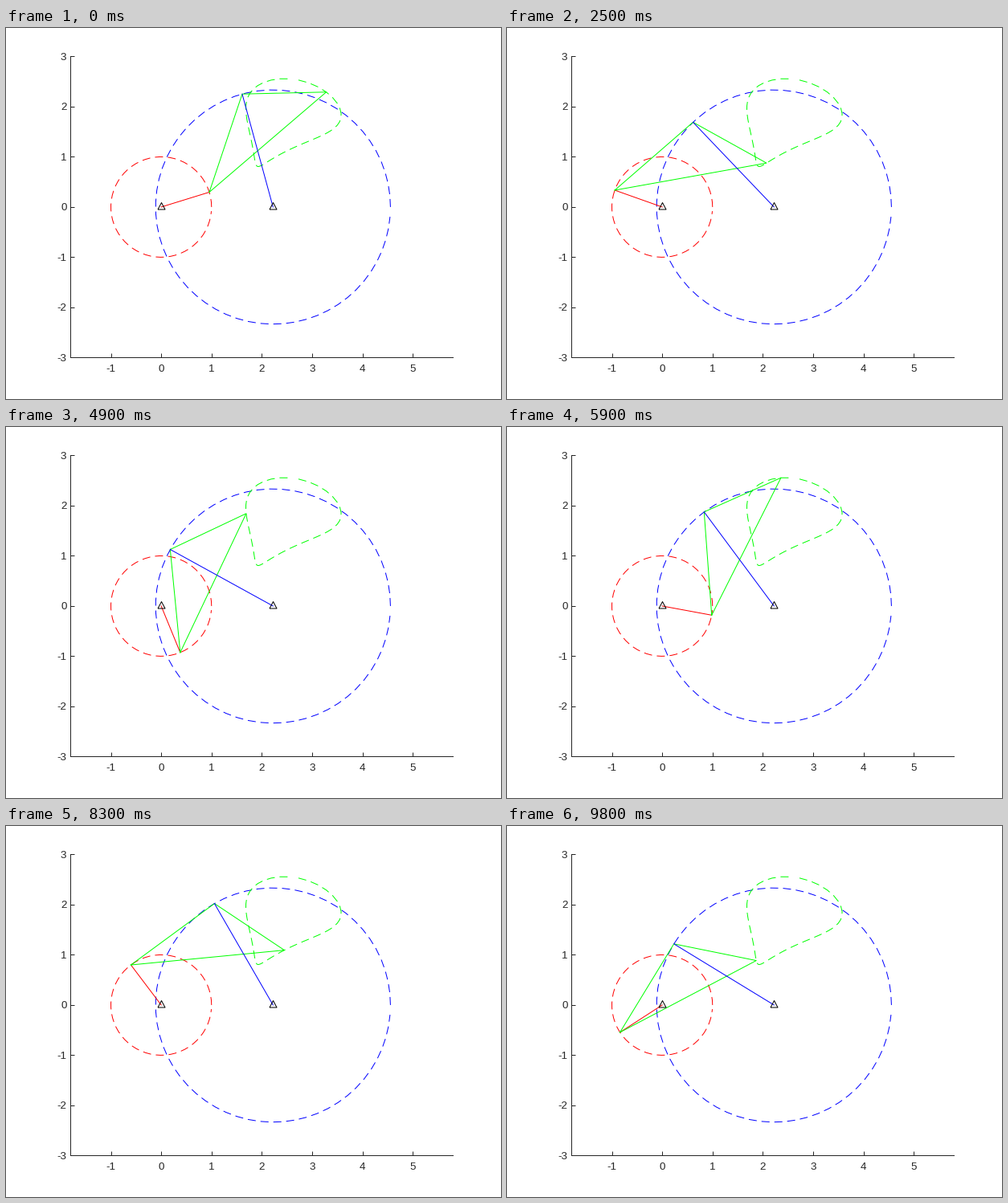
A matplotlib script for the animation above (9900 ms loop, 616 by 462 pixels).

```python
import numpy as np
import matplotlib.pyplot as plt
from matplotlib.animation import FuncAnimation

W, H, DPI = 616, 462, 100
PX = 72 / DPI                        # one pixel in points
FRAMES, INTERVAL = 99, 100

CRANK, COUPLER, ROCKER, BASE = 1.0, 2.062, 2.333, 2.222
ARM_A, ARM_B = 3.063, 1.671          # coupler point to either coupler joint
RED, GREEN, BLUE = (1, 0, 0), (0, 1, 0), (0, 0, 1)
GREY = "0.15"

plt.rcParams.update({
    "font.family": "Liberation Sans",
    "font.size": 9.6,
    "axes.unicode_minus": False,
    "lines.linewidth": PX,
    "lines.scale_dashes": True,
})


def meet(p, rp, q, rq, side):
    """Intersection of two circles, on the left (+1) or right (-1) of p -> q."""
    gap = q - p
    d = abs(gap)
    along = (rp**2 - rq**2 + d**2) / (2 * d)
    across = np.sqrt(rp**2 - along**2)
    return p + gap / d * (along + side * 1j * across)


def linkage(angle):
    a = CRANK * np.exp(1j * angle)
    b = meet(a, COUPLER, BASE, ROCKER, 1)
    p = meet(a, ARM_A, b, ARM_B, -1)
    return a, b, p


def crank_angle(i):
    held = (i in (5, 7)) + (i >= 44)  # the crank pauses on these ticks
    return 0.3 + 0.1 * (i - held)


fig = plt.figure(figsize=(W / DPI, H / DPI), dpi=DPI, facecolor="white")
left, right, top, bottom = 80.4, 556.4, 35.4, 410.45
ax = fig.add_axes([left / W, 1 - bottom / H, (right - left) / W, (bottom - top) / H])
ax.set(xlim=(-1.8, 5.8), ylim=(-3, 3), xticks=range(-1, 6), yticks=range(-3, 4))
ax.spines[["top", "right"]].set_visible(False)
for name in ("left", "bottom"):
    ax.spines[name].set(color=GREY, linewidth=PX)
ax.tick_params(direction="in", length=4.8 * PX, width=PX, color=GREY, labelcolor=GREY)
ax.tick_params(axis="x", pad=8.4 * PX)
ax.tick_params(axis="y", pad=5 * PX)


def draw(z, color, style="-"):
    return ax.plot(np.real(z), np.imag(z), color=color, linestyle=style,
                   dash_capstyle="butt", clip_on=False)[0]


# Paths of the three moving joints
turn = np.arange(0, 2 * np.pi, 0.1)
dashes = (0, (10, 6))
draw(CRANK * np.exp(1j * turn), RED, dashes)
draw(BASE + ROCKER * np.exp(1j * turn), BLUE, dashes)
draw(linkage(turn)[2], GREEN, dashes)

crank = draw([0], RED)
coupler = draw([0], GREEN)
rocker = draw([0], BLUE)

pivot = [(-4.5, -2.5), (4.5, -2.5), (0, 6), (-4.5, -2.5)]
ax.plot([0, BASE], [0, 0], linestyle="none", marker=pivot, markersize=12 * PX,
        markerfacecolor="none", markeredgecolor="black", markeredgewidth=PX)


def place(line, *points):
    line.set_data(np.real(points), np.imag(points))


def update(i):
    a, b, p = linkage(crank_angle(i))
    place(crank, 0, a)
    place(coupler, a, b, p, a)
    place(rocker, BASE, b)
    return crank, coupler, rocker


anim = FuncAnimation(fig, update, frames=FRAMES, interval=INTERVAL,
                     repeat=True, repeat_delay=0, blit=False)
plt.show()
```
